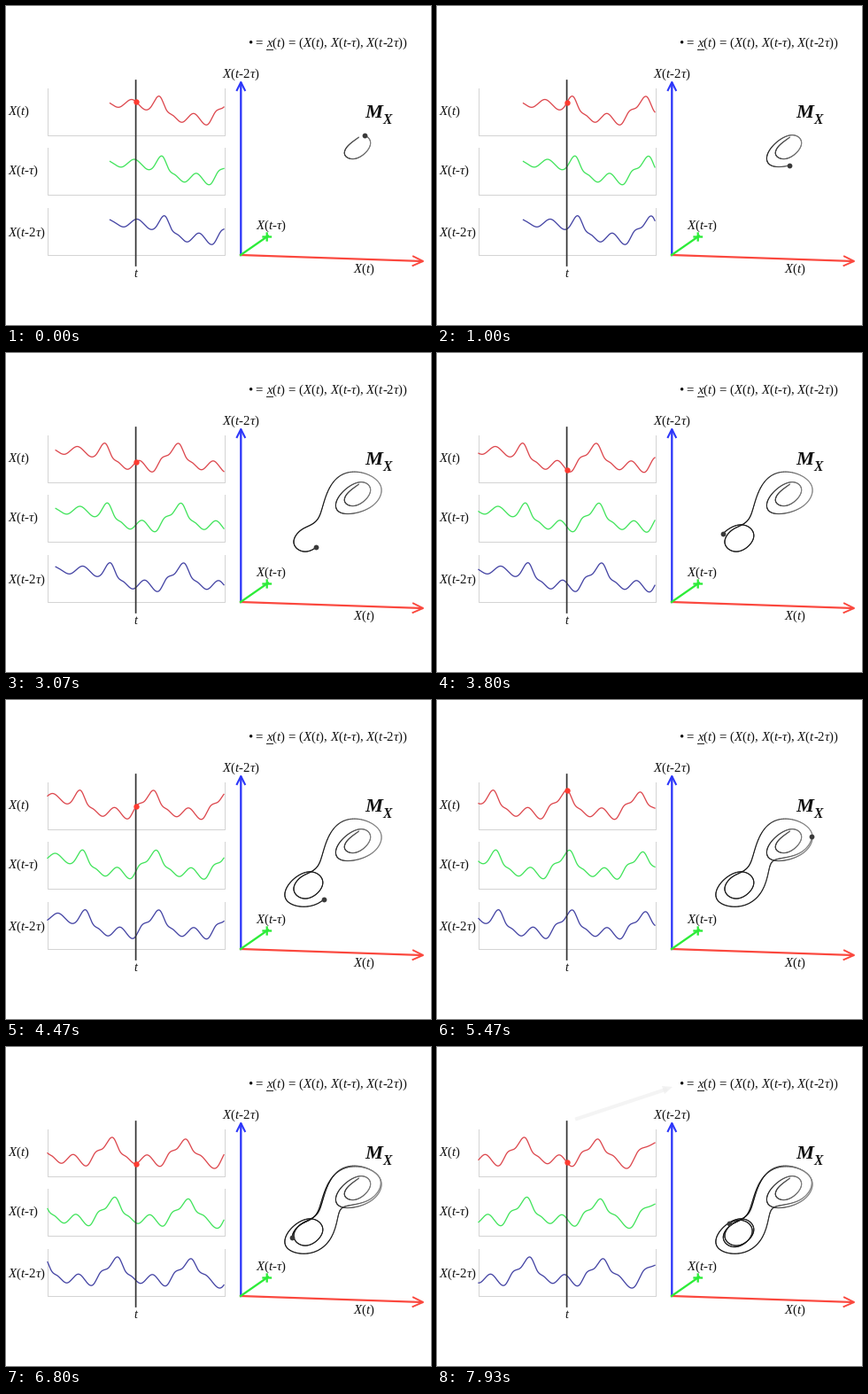
Recreate the animation shown at these times as a matplotlib script. Size 480 by 360 pixels, loop 8000 ms.

```python
import numpy as np
import matplotlib
import matplotlib.pyplot as plt
from matplotlib.animation import FuncAnimation
from matplotlib.collections import LineCollection

matplotlib.rcParams.update({
    "font.family": "Liberation Serif",
    "mathtext.fontset": "custom",
    "mathtext.rm": "Liberation Serif",
    "mathtext.it": "Liberation Serif:italic",
    "mathtext.bf": "Liberation Serif:bold",
    "mathtext.cal": "Liberation Serif:italic",
})

W, H, DPI = 480, 360, 100
PX = 72 / DPI
FRAMES, LOOP = 120, 8000
SPEED = 20            # scroll in pixels per second
LAG = 3               # tau in pixels
NOW, FIRST = 146.6, 117.5
LEFT, RIGHT = 47, 246

RED, GREEN, BLUE = "#dd484e", "#42e45c", "#4444a4"
AXIS_X, AXIS_Y, AXIS_Z = "#fb483e", "#2cec38", "#2c36fa"

# Turning points of the signal: (time, height on stage). The signal opens on
# the upper lobe, runs one two-lobe cycle twice and leaves with a deep dip.
OPENING = [(110, 105.5), (118, 110), (128, 114.2), (142, 105.5),
           (157, 117), (164, 113.5)]
CYCLE = [(0, 102.3), (7, 117), (14, 123), (25, 131.2),
         (38, 121.3), (54.5, 133.2), (62.5, 119.5), (72, 114)]
CLOSING = [(0, 104.3), (7, 116.5), (16, 122.5), (35, 135),
           (43.5, 119), (53, 113), (66, 106.5)]


def placed(points, start, drop=0):
    return [(start + t, y + drop) for t, y in points]


KNOTS, HEIGHTS = np.array(
    OPENING + placed(CYCLE, 174) + placed(CYCLE, 257.5, 0.5)
    + placed(CLOSING, 340)).T


def spline_slopes(x, y):
    """Slopes of the natural cubic spline."""
    n, h, d = len(x), np.diff(x), np.diff(y) / np.diff(x)
    a, b = np.zeros((n, n)), np.zeros(n)
    a[0, :2], b[0] = (2, 1), 3 * d[0]
    a[-1, -2:], b[-1] = (1, 2), 3 * d[-1]
    for k in range(1, n - 1):
        a[k, k - 1:k + 2] = h[k], 2 * (h[k - 1] + h[k]), h[k - 1]
        b[k] = 3 * (h[k] * d[k - 1] + h[k - 1] * d[k])
    return np.linalg.solve(a, b)


SLOPES = spline_slopes(KNOTS, HEIGHTS)


def signal(t):
    i = np.clip(np.searchsorted(KNOTS, t, side="right") - 1, 0, len(KNOTS) - 2)
    h = KNOTS[i + 1] - KNOTS[i]
    s = (t - KNOTS[i]) / h
    return (HEIGHTS[i] * (1 + 2 * s) * (1 - s) ** 2
            + HEIGHTS[i + 1] * s * s * (3 - 2 * s)
            + h * s * (1 - s) * (SLOPES[i] * (1 - s) - SLOPES[i + 1] * s))


def embed(t):
    """Project (X(t), X(t-tau), X(t-2tau)) onto the stage."""
    a, b, c = (signal(t - k * LAG) for k in range(3))
    return np.column_stack([325.5 + 3 * (131 - a) + 0.4 * (130.5 - b),
                            135 + 3.05 * (c - 102)])


fig = plt.figure(figsize=(W / DPI, H / DPI), dpi=DPI, facecolor="white")
ax = fig.add_axes([0, 0, 1, 1])
ax.set_xlim(0, W)
ax.set_ylim(H, 0)
ax.axis("off")


def stroke(xs, ys, color, width, z=2, **kw):
    return ax.plot(xs, ys, color=color, lw=width * PX, zorder=z, **kw)[0]


def label(x, y, text, size=14.9, **kw):
    return ax.text(x, y, text, fontsize=size * PX, color="#111111",
                   va="baseline", zorder=6, **kw)


def dot(color, radius):
    return ax.plot([], [], "o", color=color, ms=2 * radius * PX, mew=0, zorder=5)[0]


XT = "$X$($t$)"
XT1 = r"$X$($t$-$\tau$)"
XT2 = r"$X$($t$-2$\tau$)"

# Signal panels
for top, base, name in ((93, 123, XT), (160, 190, XT1), (228, 260, XT2)):
    stroke([LEFT, LEFT, RIGHT + 1, RIGHT + 1],
           [top, top + 53, top + 53, top], "#d4d4d4", 1, z=1)
    label(2.2, base, name)
stroke([NOW, NOW], [84, 293], "#333333", 1.7, z=3, snap=False)
label(NOW, 305.5, "$t$", 14, ha="center")

# Embedding axes
stroke([265.3, 265.3], [281, 87], AXIS_Z, 2.3, snap=False)
stroke([260.8, 265.3, 269.8], [95, 86, 95], AXIS_Z, 2.1)
stroke([265, 470], [281, 288], AXIS_X, 2.2)
stroke([460, 471, 459.5], [282.5, 288, 293], AXIS_X, 1.9)
stroke([265, 296], [281, 259.5], AXIS_Y, 2.3)
stroke([290.5, 299], [260.5, 260.5], AXIS_Y, 2.3, snap=False)
stroke([294.7, 294.7], [256.5, 264.5], AXIS_Y, 2.3, snap=False)
label(244.2, 81, XT2)
label(282.4, 252, XT1)
label(392.2, 301, XT)
label(273, 46, "• = $x$($t$) = (" + ", ".join((XT, XT1, XT2)) + ")")
stroke([294.2, 301], [48.5, 48.5], "#222222", 1)
label(405, 126, "M", 22.5, style="italic", weight="bold")
label(425, 133, "X", 15.5, style="italic", weight="bold")

# Pale pointer from the time line to the formula
pointer = [stroke([158, 258], [81, 48], "#f0f0f0", 4, z=1),
           ax.fill([266, 254, 257], [45, 44, 53], color="#eeeeee", lw=0, zorder=1)[0]]

# Moving parts: one curve for each lag, 67.5 pixels apart
curves = [stroke([], [], c, 1.3) for c in (RED, GREEN, BLUE)]
now_dot = dot("#ff3b30", 3.2)
tip_dot = dot("#3a3a3a", 2.9)
trail = LineCollection([], linewidths=1.1 * PX, zorder=3, capstyle="round")
ax.add_collection(trail)


def draw(frame):
    sec = frame * LOOP / FRAMES / 1000
    shift = SPEED * sec

    xs = np.linspace(max(LEFT, FIRST - shift), RIGHT, 400)
    for k, line in enumerate(curves):
        line.set_data(xs, signal(xs + shift - k * LAG) + 67.5 * k)
    now_dot.set_data([NOW], [signal(NOW + shift)])

    end = NOW + shift
    pts = embed(np.append(np.arange(FIRST, end, 0.2), end))
    tip_dot.set_data(pts[-1:, 0], pts[-1:, 1])
    trail.set_segments(np.stack([pts[:-1], pts[1:]], axis=1))
    shade = 0.1 + 0.42 * np.clip((pts[:-1, 0] - 365) / 50, 0, 1)
    trail.set_color(np.repeat(shade[:, None], 3, axis=1))

    for part in pointer:
        part.set_alpha(np.clip((sec - 7.7) / 0.23, 0, 1))
    return curves + [now_dot, tip_dot, trail] + pointer


anim = FuncAnimation(fig, draw, frames=FRAMES, interval=LOOP / FRAMES,
                     repeat=True, repeat_delay=0, blit=False)
plt.show()
```
